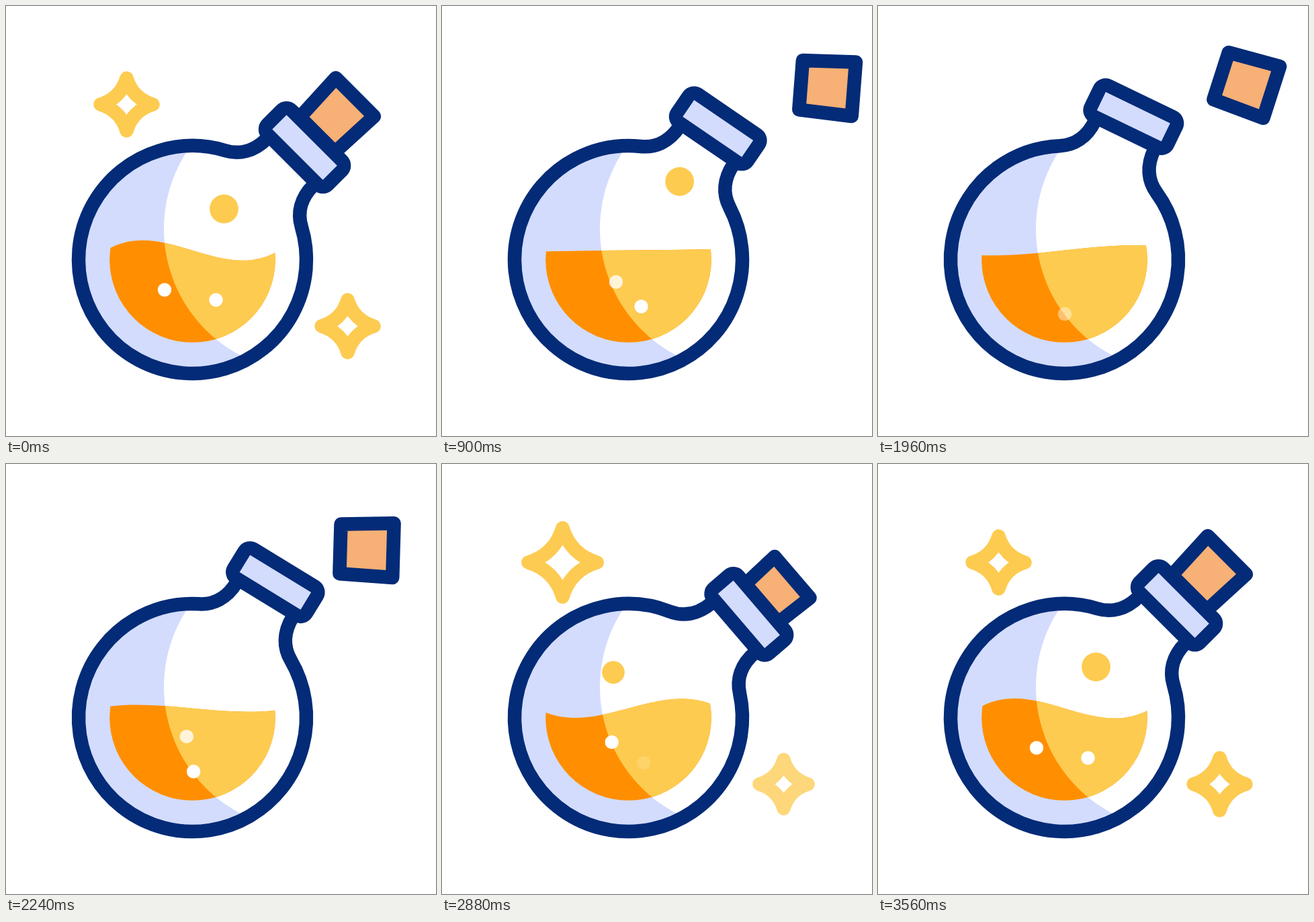
An HTML page with a canvas that plays this animation: 640 by 640 pixels, repeating every 3.6 s.

```html
<!DOCTYPE html>
<html>
<head>
<meta charset="utf-8">
<style>
  html, body { margin: 0; height: 100%; overflow: hidden; background: #fff; }
  canvas { display: block; }
</style>
</head>
<body>
<canvas id="stage" width="640" height="640"></canvas>
<script>
const ctx = document.getElementById('stage').getContext('2d');
const LOOP = 3600, TAU = Math.PI * 2, RAD = Math.PI / 180;
const CX = 277.5, CY = 377.5, BODY = 169.5, LINE = 20.5;
const NAVY = '#032b77', PALE = '#d3dcfd', YELLOW = '#fdcb50', ORANGE = '#ff8f00', PEACH = '#f7b075';

// Progress from 0 to 1 between two times: linear, then eased. A bend below 1 starts faster.
const part = (t, from, to) => Math.min(1, Math.max(0, (t - from) / (to - from)));
const ramp = (t, from, to, bend = 1) => {
  const p = part(t, from, to) ** bend;
  return p * p * (3 - 2 * p);
};
const mix = (a, b, p) => a + (b - a) * p;

function layer(draw) {
  ctx.save();
  draw();
  ctx.restore();
}

function disc(x, y, r, color) {
  ctx.beginPath();
  ctx.arc(x, y, r, 0, TAU);
  ctx.fillStyle = color;
  ctx.fill();
}

function paint(fill, stroke) {
  ctx.fillStyle = fill;
  ctx.strokeStyle = stroke;
  ctx.fill();
  ctx.stroke();
}

// Clips to the bright side of the flask, or to its shaded rest.
function clipLight(inside) {
  ctx.beginPath();
  if (!inside) ctx.rect(0, 0, 640, 640);
  ctx.arc(447, 332, 212, 0, TAU);
  ctx.clip('evenodd');
}

function shading() {
  clipLight(false);
  disc(CX, CY, BODY - 6, PALE);
}

function liquid(t) {
  // Three sloshes per loop, weaker while the flask is upright.
  const phase = TAU * 3 * t / LOOP, level = 363.7;
  const calm = ramp(t, 0, 1960, 0.8) - ramp(t, 1960, 2880, 1.5);
  const rest = 1 - ramp(t, 0, 900) + ramp(t, 2880, 3540);
  const bulge = (47 - 31 * calm) * Math.cos(phase);
  const tilt = (7.5 - 4.5 * rest) * Math.cos(phase) + 3 * calm * Math.sin(phase);
  const wave = new Path2D();
  wave.moveTo(154, level - tilt);
  wave.bezierCurveTo(236, level - bulge, 319, level + bulge, 401.5, level + tilt);
  wave.lineTo(402, 510);
  wave.lineTo(154, 510);
  ctx.beginPath();
  ctx.arc(CX, CY, 123.3, 0, TAU);
  ctx.clip();
  ctx.fillStyle = ORANGE;
  ctx.fill(wave);
  clipLight(true);
  ctx.fillStyle = YELLOW;
  ctx.fill(wave);
}

// A white bubble that slides between two points and blinks out at the given times.
function fizz(t, [x0, y0], [x1, y1], slide, dips) {
  ctx.globalAlpha = Math.min(...dips.map(dip => ramp(Math.abs(t - dip), 0, 400)));
  disc(mix(x0, x1, slide), mix(y0, y1, slide), 10.2, '#fff');
}

function drop(t) {
  if (t < 2200) {
    const rise = ramp(t, 500, 1780, 1.2);
    disc(324.5 + 112 * rise ** 0.72, 302 - 264 * rise, 21.4 * (1 - ramp(t, 1660, 1860)), YELLOW);
  } else {
    disc(mix(236, 324.5, ramp(t, 2600, 3540)), mix(350, 302, ramp(t, 2600, 2980)),
      21.4 * ramp(t, 2600, 3000), YELLOW);
  }
}

function star(x, y, t) {
  t = (t + LOOP) % LOOP;
  const scale = 1 + 0.42 * ramp(t, 0, 270) - 1.42 * ramp(t, 270, 580)
    + 1.42 * ramp(t, 2590, 2940) - 0.42 * ramp(t, 2940, 3320);
  const tip = 39 * scale, c = 9 * scale;
  ctx.globalAlpha = Math.max(0, 1 - ramp(t, 420, 580) + ramp(t, 2590, 2900));
  ctx.translate(x, y);
  ctx.beginPath();
  ctx.moveTo(0, -tip);
  ctx.quadraticCurveTo(c, -c, tip, 0);
  ctx.quadraticCurveTo(c, c, 0, tip);
  ctx.quadraticCurveTo(-c, c, -tip, 0);
  ctx.quadraticCurveTo(-c, -c, 0, -tip);
  ctx.closePath();
  ctx.strokeStyle = YELLOW;
  ctx.stroke();
}

function cork(t) {
  const up = 302.6 + 78.4 * ramp(t, 300, 800) - 28 * ramp(t, 600, 1960, 1.2)
    - 71.4 * ramp(t, 1960, 2880, 1.6) + 21 * ramp(t, 2880, 3540);
  const side = 130 * (ramp(t, 480, 1960, 0.3) - ramp(t, 1960, 2730));
  const turn = 82 * (ramp(t, 480, 1960, 0.33) - ramp(t, 1960, 2790));
  ctx.translate(side, -up);
  ctx.rotate(turn * RAD);
  ctx.beginPath();
  ctx.moveTo(-40.4, -39.5);
  ctx.lineTo(40.4, -39.5);
  ctx.lineTo(36.8, 39.5);
  ctx.lineTo(-36.8, 39.5);
  ctx.closePath();
  paint(PEACH, NAVY);
}

function glass() {
  const gap = 28.2 * RAD, top = -Math.PI / 2;
  ctx.beginPath();
  ctx.moveTo(49, -206);
  ctx.bezierCurveTo(49, -178, 61.4, -159.4, 80.1, -149.4);
  ctx.arc(0, 0, BODY, top + gap, top - gap + TAU);
  ctx.bezierCurveTo(-61.4, -159.4, -49, -178, -49, -206);
  ctx.strokeStyle = NAVY;
  ctx.stroke();
}

function collar() {
  ctx.beginPath();
  ctx.roundRect(-63.5, -261.5, 127, 50.5, 10.25);
  paint(PALE, NAVY);
}

function flask(t) {
  const lean = 45 - 19.2 * ramp(t, 0, 1960, 0.8) + 23.6 * ramp(t, 1960, 2840) - 4.4 * ramp(t, 2880, 3540);
  ctx.translate(CX, CY);
  ctx.rotate(lean * RAD);
  layer(() => cork(t));
  glass();
  collar();
}

function frame(now) {
  const t = now % LOOP;
  ctx.fillStyle = '#fff';
  ctx.fillRect(0, 0, 640, 640);
  ctx.lineWidth = LINE;
  ctx.lineJoin = 'round';

  layer(shading);
  layer(() => liquid(t));
  layer(() => fizz(t, [236, 422.5], [276, 402],
    ramp(t, 0, 1900, 0.8) - part(t, 1960, 3540), [620, 1960]));
  layer(() => fizz(t, [312.5, 437.5], [278, 458.5],
    ramp(t, 0, 1480, 1.5) - ramp(t, 2100, 3400), [1780, 2980]));
  drop(t);
  layer(() => star(179.5, 146.5, t));
  layer(() => star(508.5, 476.5, t - 80));
  layer(() => flask(t));
  requestAnimationFrame(() => frame(performance.now() - start));
}

const start = performance.now();
frame(0);
</script>
</body>
</html>
```
